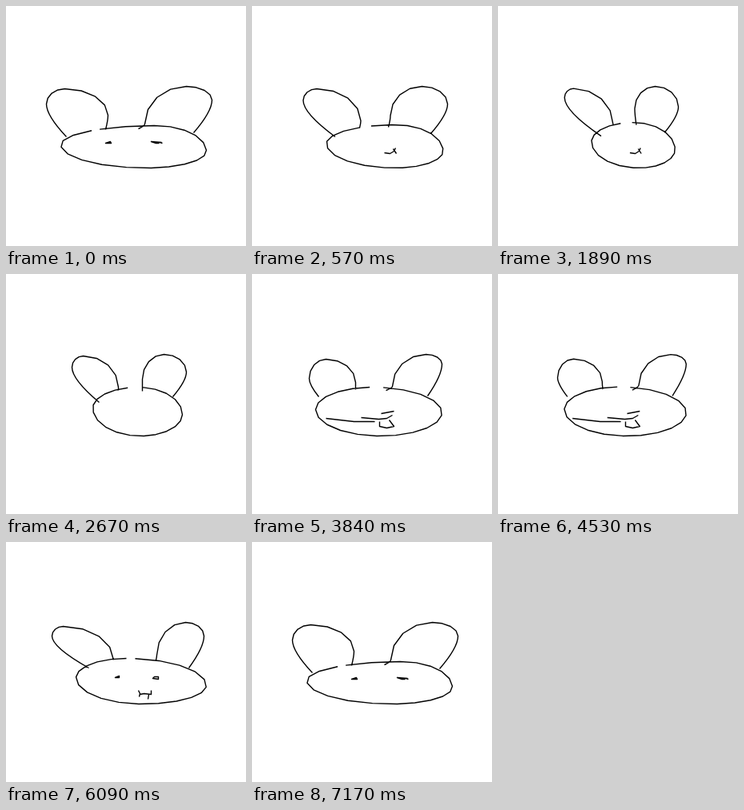
Recreate the animation shown at these times as an HTML page. Size 300 by 300 pixels, loop 7.2 s.

```html
<!DOCTYPE html>
<html>
<head>
<meta charset="utf-8">
<title>Morphing rabbit sketch</title>
<style>
  html, body { margin: 0; height: 100%; overflow: hidden; background: #fff; }
  svg { display: block; width: 100%; height: 100%; }
  path { fill: none; stroke: #000; stroke-width: 1.4; stroke-linejoin: round; vector-effect: non-scaling-stroke; }
</style>
</head>
<body>
<svg viewBox="0 0 300 300"><path id="ink"/></svg>
<script>
const LOOP = 7200, STEP = 30, CENTER = 154;

// Ear: base, left side, tip, right side, base. Head: top, left, bottom, right.
// Span: where the head line starts and ends, in quarter turns from the top.
// Bend: how far the sides of the ears curve before they run to the base.
const wide = {
  left: [[75, 163], [50, 122], [73, 103], [127, 136], [124, 154]],
  right: [[165, 153], [173, 147], [225, 100], [257, 117], [234, 158]],
  head: [[186, 149], [68, 173], [176, 202], [250, 181]],
  span: [.47, 4.4], bend: .35,
  face: 'M124,171L130,169L131,171ZM194,170L181,169L187,171H191M192,170L195,171'
};
const tilted = {
  left: [[132, 163], [77, 113], [88, 103], [144, 150], [144, 150]],
  right: [[175, 149], [172, 126], [199, 100], [231, 127], [212, 160]],
  head: [[172, 147], [117, 170], [182, 202], [227, 181]],
  span: [.22, 4.06], bend: .35,
  face: 'M165,183L172,184L177,181L179,177M176,178L180,184'
};
const blank = {
  left: [[116, 160], [82, 116], [96, 102], [140, 141], [140, 145]],
  right: [[170, 146], [170, 131], [197, 100], [225, 122], [208, 153]],
  head: [[165, 141], [108, 167], [168, 202], [220, 175]],
  span: [.15, 3.94], bend: .35,
  face: ''
};
const grin = {
  left: [[83, 153], [71, 130], [92, 106], [129, 135], [129, 144]],
  right: [[167, 145], [175, 140], [217, 100], [237, 112], [219, 152]],
  head: [[150, 141], [79, 169], [160, 202], [237, 173]],
  span: [.03, 3.9], bend: .35,
  face: 'M92,180L127,184H153M136,179L158,181L168,180L175,176M161,174L177,171M171,182L177,190L168,192L159,190V184'
};
const seated = {
  left: [[143, 151], [122, 107], [125, 100], [141, 110], [158, 136]],
  right: [[179, 136], [191, 103], [194, 102], [203, 114], [199, 147]],
  head: [[172, 133], [140, 163], [174, 202], [209, 176]],
  span: [-.16, 3.77], bend: 0,
  face: 'M167,170L171,169L169,174M172,174H176V170L180,167L183,172L180,174L176,170M183,170L189,168'
};
const smile = {
  left: [[103, 157], [57, 117], [71, 105], [134, 147], [134, 147]],
  right: [[187, 147], [188, 141], [224, 100], [247, 117], [228, 157]],
  head: [[150, 145], [87, 169], [170, 202], [250, 179]],
  span: [0, 3.93], bend: .35,
  face: 'M136,169L141,167V169ZM183,170L185,168H190V171ZM165,185L167,189L166,193M167,190L172,189L181,190V185M178,190L177,196'
};
const body = [[146, 142], [98, 162], [148, 198], [176, 180]];

// time, pose, horizontal scale
const keys = [
  [0, wide, 1], [1140, tilted, 1], [1530, tilted, .92], [2670, blank, 1],
  [3600, grin, 1.03], [3840, grin, 1], [4500, grin, .99], [5190, seated, 1],
  [5400, seated, 1], [6090, smile, 1], [6870, wide, 1.045], [LOOP - STEP, wide, 1]
];

const mix = (a, b, k) => Array.isArray(a) ? a.map((v, i) => mix(v, b[i], k)) : a + (b - a) * k;

// Points on four quarter ellipses that join the extremes of a shape
function arc([top, left, bottom, right], from, to, count) {
  return Array.from({ length: count + 1 }, (_, i) => {
    const angle = mix(from, to, i / count) * Math.PI / 2;
    const sin = Math.sin(angle), cos = Math.cos(angle);
    const pole = cos > 0 ? top : bottom, side = sin > 0 ? left : right;
    return [mix(pole[0], side[0], Math.abs(sin)), mix(side[1], pole[1], Math.abs(cos))];
  }).join('L');
}

function ear([base, left, tip, right, end], bend) {
  const control = (side, foot) => [side[0], mix(side[1], foot[1], bend)];
  return `M${base}Q${control(left, base)} ${left}L${arc([tip, left, tip, right], 1, -1, 8)}` +
    `L${right}Q${control(right, end)} ${end}`;
}

const ink = document.getElementById('ink');

function draw(t) {
  const next = Math.max(1, keys.findIndex(key => key[0] >= t));
  const [t0, from, s0] = keys[next - 1], [t1, to, s1] = keys[next];
  const k = (t - t0) / (t1 - t0);
  const part = name => mix(from[name], to[name], k);

  const bend = part('bend');
  let d = ear(part('left'), bend) + ear(part('right'), bend) +
    'M' + arc(part('head'), ...part('span'), 20) + (k < .5 ? from : to).face;
  if (t > 4900 && t < 5700) d += 'M' + arc(body, 0, 3, 14);

  ink.setAttribute('d', d);
  ink.setAttribute('transform', `translate(${CENTER + .5} .5) scale(${mix(s0, s1, k)} 1) translate(${-CENTER})`);
}

const start = performance.now();
function tick() {
  const t = (performance.now() - start) % LOOP;
  draw(Math.floor(t / STEP) * STEP);
  requestAnimationFrame(tick);
}
tick();
</script>
</body>
</html>
```
